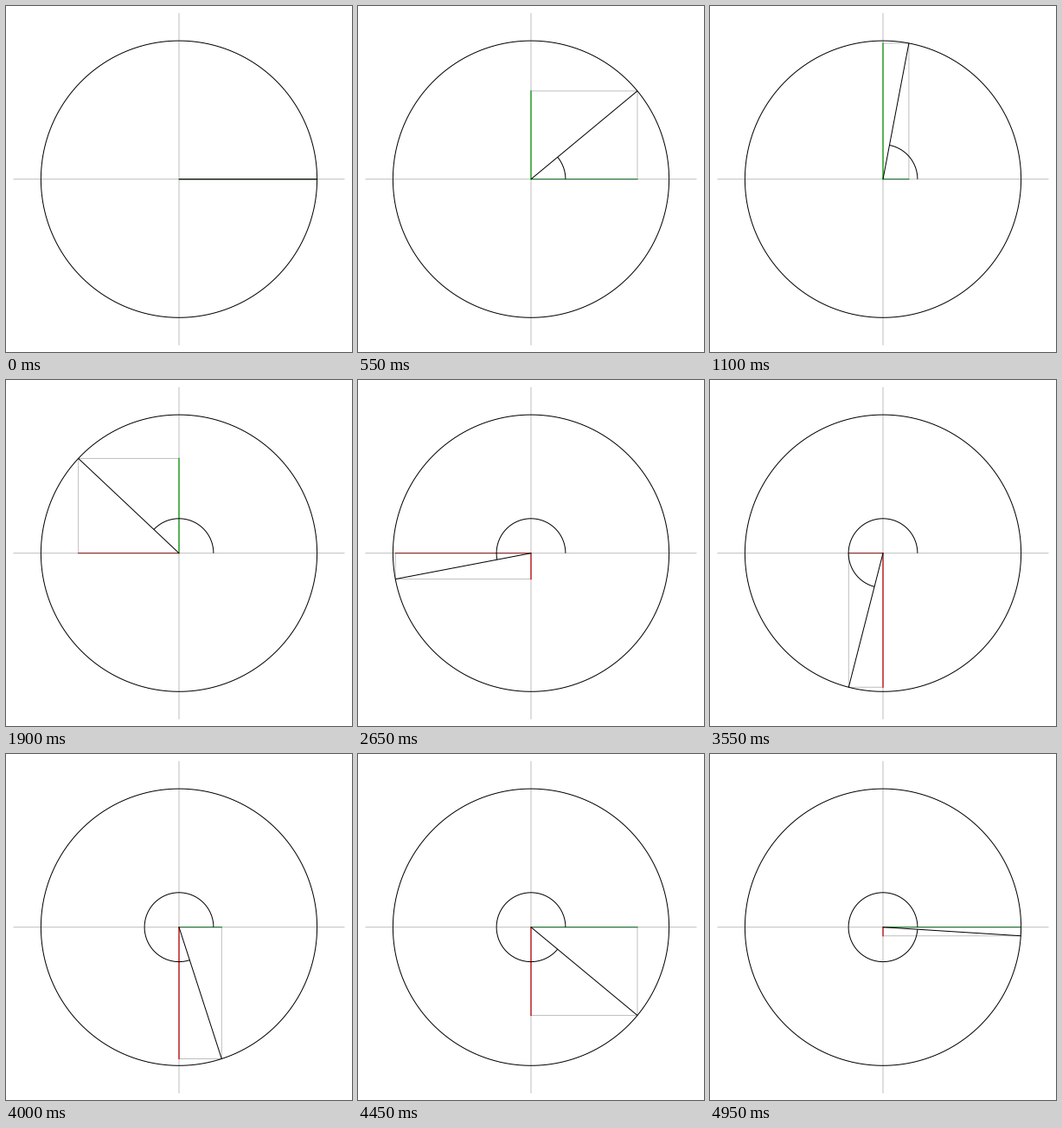
Write a matplotlib script that moves like this. It is 400 px wide and 399 px high and loops after 5000 ms.

```python
import numpy as np
import matplotlib.pyplot as plt
from matplotlib.animation import FuncAnimation

W, H, DPI = 400, 399, 64
PX = 72 / DPI                 # one pixel in points
CX, CY, R = 200.0, 199.7, 159.6
FRAMES, INTERVAL = 100, 50

GREY = "#bfbfbf"
COS_COLORS = ((0.0, 0.42, 0.08), (0.6, 0.04, 0.04))   # positive, negative
SIN_COLORS = ((0.0, 0.6, 0.0), (0.72, 0.0, 0.0))

fig = plt.figure(figsize=(W / DPI, H / DPI), dpi=DPI, facecolor="white")
ax = fig.add_axes([0, 0, 1, 1])
ax.set_xlim(0, W)
ax.set_ylim(H, 0)
ax.axis("off")


def place(line, x, y):
    """Put unit-circle coordinates on the stage."""
    line.set_data(CX + R * np.asarray(x), CY - R * np.asarray(y))


def make_line(color, width=1.0, cap="butt", x=(), y=()):
    line, = ax.plot([], [], color=color, lw=width * PX,
                    solid_capstyle=cap, snap=False)
    place(line, x, y)
    return line


def arc(angle, radius, n=200):
    t = np.linspace(0, angle, n)
    return radius * np.cos(t), radius * np.sin(t)


make_line(GREY, x=(-1.2, 1.2), y=(0, 0))
make_line(GREY, x=(0, 0), y=(-1.2, 1.2))
guides = make_line(GREY)
cos_line = make_line(COS_COLORS[0], cap="projecting")
sin_line = make_line(SIN_COLORS[0], 1.2, "projecting")
circle_x, circle_y = arc(2 * np.pi, 1)
make_line("black", x=circle_x, y=circle_y)
angle_arc = make_line("black")
radius_line = make_line("black")


def update(i):
    angle = 2 * np.pi * i / FRAMES
    c, s = np.cos(angle), np.sin(angle)
    place(guides, (c, c, 0), (0, s, s))
    place(cos_line, (0, c), (0, 0))
    place(sin_line, (0, 0), (0, s))
    cos_line.set_color(COS_COLORS[int(c < 0)])
    sin_line.set_color(SIN_COLORS[int(s < 0)])
    place(angle_arc, *arc(angle, 0.25))
    place(radius_line, (0, c), (0, s))
    return guides, cos_line, sin_line, angle_arc, radius_line


anim = FuncAnimation(fig, update, frames=FRAMES, interval=INTERVAL,
                     repeat=True, repeat_delay=0)
plt.show()
```
